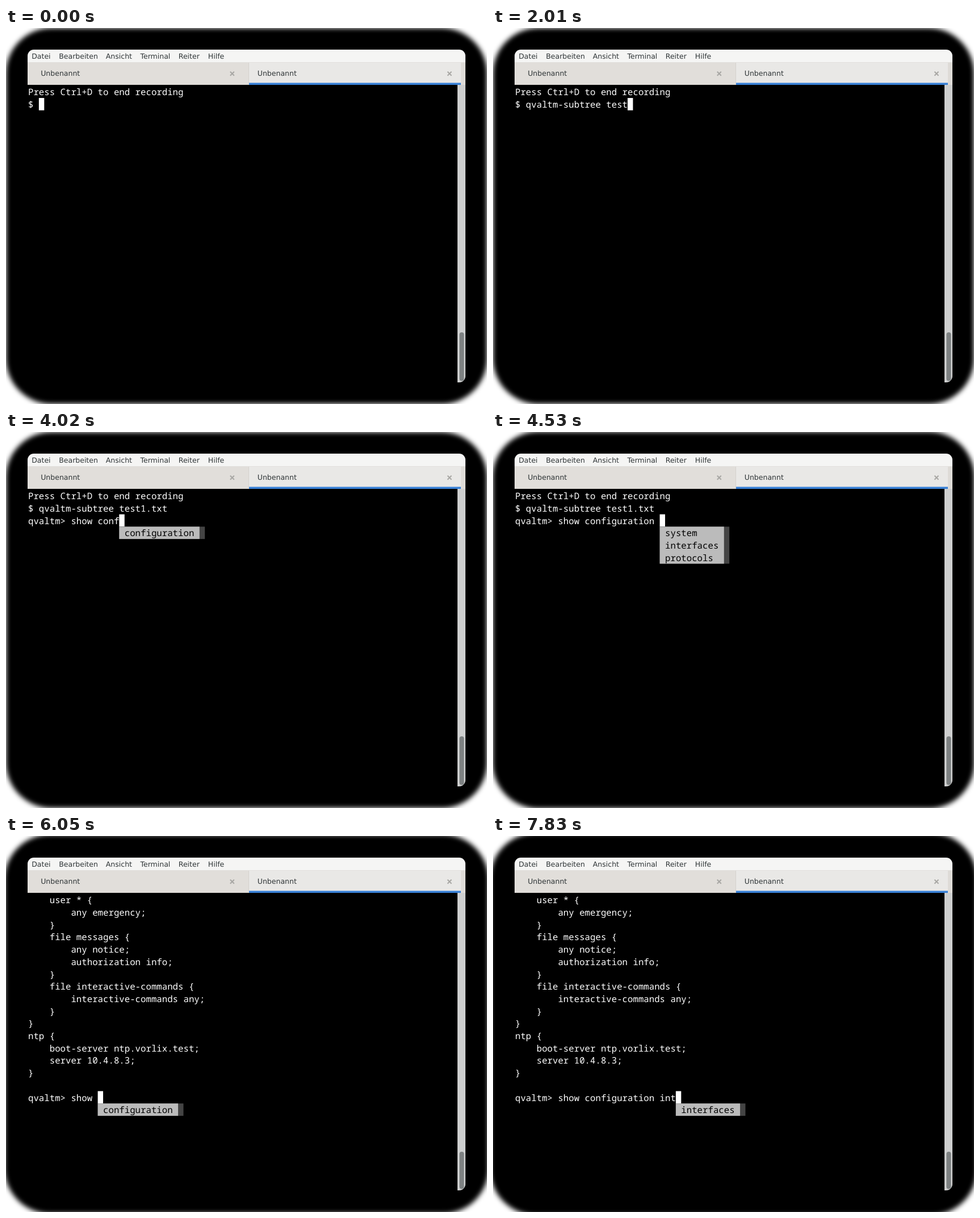
Recreate the animation shown at these times as an HTML page with a canvas. Size 847 by 661 pixels, loop 8 s.

```html
<!DOCTYPE html>
<html lang="de">
<head>
<meta charset="utf-8">
<style>
  html, body { margin: 0; width: 100%; height: 100%; overflow: hidden; background: #fff; }
  canvas { display: block; }
</style>
</head>
<body>
<canvas id="stage" width="847" height="661"></canvas>
<script>
const ctx = document.getElementById('stage').getContext('2d');
const LOOP = 8000;
const CELL_W = 9.43, CELL_H = 21.7, LEFT = 39, TOP = 101.3;

const PROMPT = 'qvaltm> ';
const COMMAND = 'qvaltm-subtree test1.txt ';
const INTRO = 'Press Ctrl+D to end recording';
const started = [INTRO, '$ ' + COMMAND];
const listing = `    user * {
        any emergency;
    }
    file messages {
        any notice;
        authorization info;
    }
    file interactive-commands {
        interactive-commands any;
    }
}
ntp {
    boot-server ntp.vorlix.test;
    server 10.4.8.3;
}
`.split('\n');

const SHOW = ['show'], CONF = ['configuration'], SYS = ['system'], INT = ['interfaces'];
const SECTIONS = ['system', 'interfaces', 'protocols'];
const CONFIG = 'show configuration';

const shell = length => ({ lines: [INTRO, '$ ' + COMMAND.slice(0, length)] });

// A menu opened earlier than the cursor position has its entry selected.
const ask = (history, typed, items = [], openedAt = typed.length) => ({
  lines: [...history, PROMPT + typed],
  items,
  menuCol: PROMPT.length + openedAt,
  selected: openedAt < typed.length,
  scrolled: history === listing
});
const first = (...args) => ask(started, ...args);
const second = (...args) => ask(listing, ...args);

const steps = [
  [0, shell(0)],
  [250, shell(2)],
  [500, shell(5)],
  [750, shell(7)],
  [1000, shell(10)],
  [1250, shell(12)],
  [1500, shell(14)],
  [1750, shell(17)],
  [2010, shell(19)],
  [2260, shell(25)],
  [2510, { lines: [...started, ''] }],
  [2760, first('')],
  [3010, first('s', SHOW)],
  [3260, first('sho', SHOW)],
  [3520, first('show ', CONF)],
  [3770, first('show c', CONF)],
  [4020, first('show conf', CONF)],
  [4270, first(CONFIG, CONF, 9)],
  [4530, first(CONFIG + ' ', SECTIONS)],
  [4780, first(CONFIG + ' s', SYS)],
  [5040, first(CONFIG + ' sys', SYS)],
  [5290, first(CONFIG + ' system', SYS, 22)],
  [5550, second('')],
  [5800, second('sh', SHOW)],
  [6050, second('show ', CONF)],
  [6310, second('show c', CONF)],
  [6570, second('show co', CONF)],
  [6820, second('show conf', CONF)],
  [7070, second('show confi', CONF)],
  [7320, second(CONFIG, CONF, 10)],
  [7580, second(CONFIG + ' ', SECTIONS)],
  [7830, second(CONFIG + ' int', INT)]
];

function rect(x, y, w, h, color) {
  ctx.fillStyle = color;
  ctx.fillRect(x, y, w, h);
}

function rounded(x, y, w, h, radius, color) {
  ctx.beginPath();
  ctx.roundRect(x, y, w, h, radius);
  ctx.fillStyle = color;
  ctx.fill();
}

function label(text, x, y) {
  ctx.font = '12.5px "DejaVu Sans", sans-serif';
  ctx.fillStyle = '#2e3436';
  ctx.fillText(text, x, y);
}

function cells(col, row, cols, rows, color) {
  rect(LEFT + col * CELL_W, TOP + row * CELL_H, cols * CELL_W, rows * CELL_H, color);
}

function print(text, col, row, color) {
  ctx.font = '15.72px "Noto Sans Mono", monospace';
  ctx.fillStyle = color;
  [...text].forEach((char, i) =>
    ctx.fillText(char, LEFT + (col + i) * CELL_W, TOP + row * CELL_H + 17));
}

function drawShadow(index) {
  rect(0, 0, 847, 661, '#fff');
  // The shadow grows outwards during the second half.
  const grow = 5 * Math.max(0, index - 16) / 15;
  ctx.filter = 'blur(4px)';
  rounded(-grow, -grow, 847 + 2 * grow, 661 + 2 * grow, 80, '#000');
  ctx.filter = 'none';
}

function drawTab(x, width, textX, closeX, color) {
  rect(x, 61, width, 39, color);
  label('Unbenannt', textX, 84);
  ctx.strokeStyle = '#a8a7a4';
  ctx.lineWidth = 2;
  ctx.beginPath();
  for (const s of [-1, 1]) {
    ctx.moveTo(closeX - 3.5, 80.3 - 3.5 * s);
    ctx.lineTo(closeX + 3.5, 80.3 + 3.5 * s);
  }
  ctx.stroke();
}

function drawWindow(scrolled) {
  rounded(38, 38, 771, 62, [11, 11, 0, 0], '#f5f5f4');
  [['Datei', 45.2], ['Bearbeiten', 93.2], ['Ansicht', 175.8],
   ['Terminal', 236.5], ['Reiter', 303.8], ['Hilfe', 355.8]]
    .forEach(([text, x]) => label(text, x, 53.5));
  rect(38, 61, 771, 39, '#dedbd7');
  drawTab(38, 389, 61.2, 398.3, '#e1deda');
  drawTab(428, 373, 442.8, 781, '#e9e8e6');
  rect(38, 60, 771, 1, '#e2e0dd');
  rect(427, 61, 1, 39, '#d5d1cd');
  rect(38, 99, 389, 1, '#d5d1cd');
  rect(428, 96.4, 373, 3.6, '#3880d6');
  rounded(795, 100, 14, 523, [0, 0, 11, 0], '#cecfcf');
  const thumb = scrolled ? 555 : 535;
  rounded(798.5, thumb, 8, 620.5 - thumb, 4, '#7d8182');
}

function drawMenu({ items, menuCol, selected }, row) {
  const width = Math.max(...items.map(item => item.length)) + 2;
  cells(menuCol, row, width + 1, items.length, '#444');
  cells(menuCol, row, width, items.length, selected ? '#888' : '#bbb');
  items.forEach((item, i) =>
    print(item, menuCol + 1, row + i, selected ? '#fff' : '#000'));
}

function draw(index) {
  const state = steps[index][1];
  drawShadow(index);
  drawWindow(state.scrolled);
  state.lines.forEach((line, row) => print(line, 0, row, '#fff'));
  const lastRow = state.lines.length - 1;
  cells(state.lines[lastRow].length, lastRow, 1, 1, '#fff');
  if (state.items?.length) drawMenu(state, lastRow + 1);
}

let shown = -1;
function tick() {
  const time = performance.now() % LOOP;
  const index = steps.findLastIndex(([start]) => start <= time);
  if (index !== shown) draw(shown = index);
  requestAnimationFrame(tick);
}

ctx.textRendering = 'geometricPrecision';
tick();
</script>
</body>
</html>
```
